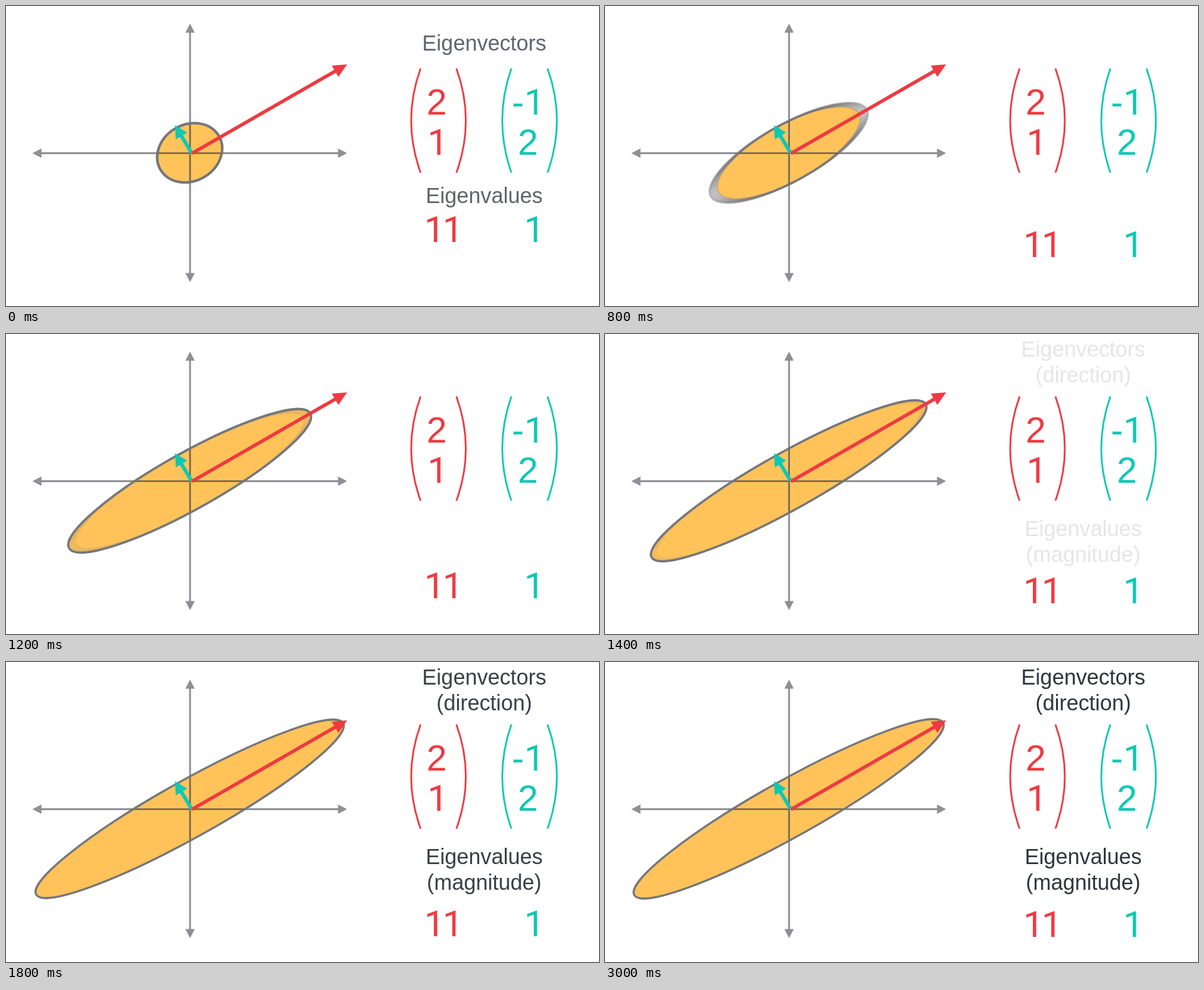
Write an HTML page that moves like this. It is 944 px wide and 478 px high and loops after 3.6 s.

```html
<!DOCTYPE html>
<html lang="en">
<head>
<meta charset="utf-8">
<title>Eigenvectors and eigenvalues</title>
<style>
  html, body { margin: 0; width: 100%; height: 100%; overflow: hidden; background: #fff; }
  svg { display: block; width: 100vw; height: 100vh; }
  .label { font: 34.2px "Liberation Sans", Arial, sans-serif; fill: #30343c; text-anchor: middle; }
  .num { font: 58px "Liberation Sans", Arial, sans-serif; text-anchor: middle; }
  .one { font-family: Roboto, sans-serif; text-anchor: start; }
  .bracket { fill: none; stroke-width: 2.8; }
</style>
</head>
<body>
<svg id="stage" viewBox="0 0 944 478" xmlns="http://www.w3.org/2000/svg"></svg>
<script>
const NS = "http://www.w3.org/2000/svg";
const RED = "#ee3a42", TEAL = "#0cc8b4", GREY = "#8f9096", EDGE = "#75767b";
const CX = 292.4, CY = 233.9, MINOR = 45;
const STEP = 200, LOOP = 3600, TRAILS = 7;

// Half length of the ellipse at each step
const majors = [53.7, 56, 75, 104, 142, 182, 220, 250, 270, 280, 281.6];
const last = majors.length - 1;
const stage = document.getElementById("stage");

function add(tag, attrs, parent = stage, text) {
  const el = document.createElementNS(NS, tag);
  set(el, attrs);
  if (text) el.textContent = text;
  parent.appendChild(el);
  return el;
}

function set(el, attrs) {
  for (const key in attrs) el.setAttribute(key, attrs[key]);
}

function arrow(x1, y1, x2, y2, color, width, head, half, parent) {
  const d = Math.hypot(x2 - x1, y2 - y1);
  const ux = (x2 - x1) / d, uy = (y2 - y1) / d;
  const bx = x2 - ux * head, by = y2 - uy * head;
  add("line", { x1, y1, x2: bx + ux, y2: by + uy, stroke: color, "stroke-width": width }, parent);
  add("polygon", {
    points: `${x2},${y2} ${bx - uy * half},${by + ux * half} ${bx + uy * half},${by - ux * half}`,
    fill: color
  }, parent);
}

function axes(color, width, parent) {
  const tips = [[42, 234.5], [543, 234.5], [293, 28], [293, 440]];
  for (const [x, y] of tips) arrow(293, 234.5, x, y, color, width, 14.5, 7.5, parent);
}

function bracket(x, bulge, color) {
  add("path", { d: `M${x} 99.5Q${x + 2 * bulge} 182.5 ${x} 265.5`, stroke: color, class: "bracket" });
}

function num(text, x, y, color, parent) {
  return add("text", { x, y, fill: color, class: "num" }, parent, text);
}

// x is the centre of the visible digit
function one(x, y, color, parent) {
  num("1", x - 12.6, y, color, parent).classList.add("one");
}

function labels(rows) {
  const g = add("g", { class: "label" });
  for (const [text, y] of rows) add("text", { x: 761.3, y }, g, text);
  return g;
}

const place = { cx: CX, cy: CY, ry: MINOR, transform: `rotate(-29.2 ${CX} ${CY})` };
const clip = add("clipPath", { id: "inside" }, add("defs", {}));
const mask = add("ellipse", place, clip);

axes(GREY, 3);
const body = add("ellipse", { ...place, fill: "#ffc35a" });
const trailBox = add("g", { fill: "none", stroke: EDGE, "stroke-width": 3.2 });
const trails = Array.from({ length: TRAILS }, () => add("ellipse", place, trailBox));
axes("#6d6254", 2.6, add("g", { "clip-path": "url(#inside)" }));
const outline = add("ellipse", { ...place, fill: "none", stroke: EDGE });
arrow(296, 235, 269, 190, TEAL, 5.6, 20, 10.5);
arrow(296, 234.8, 543, 93, RED, 5.4, 22, 10.3);

bracket(660, -15, RED);
bracket(717, 15, RED);
bracket(804.5, -14.5, TEAL);
bracket(862, 15, TEAL);
num("2", 685.7, 173.4, RED);
one(683.7, 237.4, RED);
num("-", 815, 173.4, TEAL);
one(837.5, 173.4, TEAL);
num("2", 831, 237.4, TEAL);

const values = add("g", {});
one(678.3, 0, RED, values);
one(707.7, 0, RED, values);
one(837.3, 0, TEAL, values);

const before = labels([["Eigenvectors", 71], ["Eigenvalues", 314]]);
const after = labels([
  ["Eigenvectors", 36], ["(direction)", 77],
  ["Eigenvalues", 322], ["(magnitude)", 363]
]);

const clamp = v => Math.max(0, Math.min(1, v));

function draw(ms) {
  const step = Math.min(last, Math.floor(ms % LOOP / STEP));
  const rx = majors[step];
  const p = (rx - majors[0]) / (majors[last] - majors[0]);
  const lag = 0.36 * (rx - majors[Math.max(0, step - 1)]);

  // While speeding up, the fill lags behind a smeared edge
  const smeared = step > 0 && p < 0.5;
  const inner = smeared ? rx - lag : rx;

  set(mask, { rx: inner });
  set(body, { rx: inner });
  set(outline, { rx, "stroke-width": 4 - 0.7 * p, opacity: smeared ? 0.2 : 1 });
  trails.forEach((el, i) => set(el, {
    rx: rx - lag * i / (TRAILS - 1),
    opacity: smeared ? 0.36 : 0.3 * (1 - p)
  }));
  values.setAttribute("transform", `translate(0 ${376 + 61.7 * p})`);
  before.setAttribute("opacity", clamp(0.76 - 0.295 * step));
  after.setAttribute("opacity", clamp(0.12 + 0.415 * (step - 7)));
}

function tick() {
  draw(performance.now());
  requestAnimationFrame(tick);
}
tick();
</script>
</body>
</html>
```
